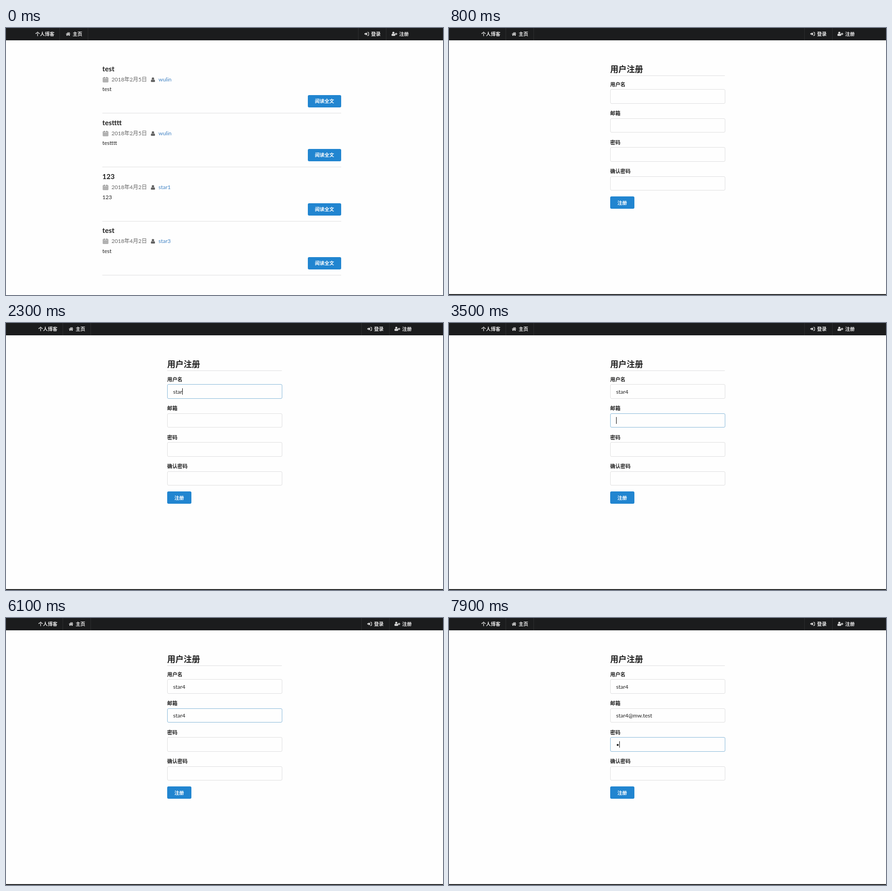
An HTML page for the animation above (8000 ms loop, 957 px wide and 585 px high).

```html
<!DOCTYPE html>
<html lang="zh-CN">
<head>
<meta charset="utf-8">
<title>个人博客</title>
<style>
  html, body { margin: 0; width: 100%; height: 100%; overflow: hidden; background: #fefefe; }
  svg { display: block; width: 957px; height: 585px; }
  text { font: 12px Lato, "Noto Sans CJK SC", "Noto Sans CJK", sans-serif; fill: #212121; white-space: pre; }
  rect { shape-rendering: crispEdges; }
  .bold, .nav, .btn, .label, .head, .title { font-weight: 700; }
  .nav, .btn { font-size: 10.5px; }
  .nav { fill: #e8e8e8; }
  .btn { fill: #fff; }
  .label { font-size: 11.14px; }
  .head { font-size: 15.43px; }
  .title { font-size: 18px; }
  .meta { fill: #666; }
  .link { fill: #4183c4; }
  .bar { fill: #1b1c1d; }
  .sep { fill: #2d2e2f; }
  .rule { fill: #dededf; }
  .blue { fill: #2185d0; shape-rendering: auto; }
  .box { fill: #fefefe; stroke: #dededf; shape-rendering: auto; }
  .box.on { stroke: #85b7d9; }
  .icon { fill: #dcdcdc; }
  .gray { fill: #606060; }
  .line { fill: none; stroke: #dcdcdc; stroke-width: 1.3; }
  .thin { fill: none; stroke: #6c6c6c; stroke-width: .8; }
</style>
</head>
<body>
<svg id="stage" viewBox="0 0 957 585">
  <defs>
    <g id="user">
      <circle cx="4.5" cy="2.8" r="2.6"/>
      <path d="M2.3 5Q4.5 6.9 6.7 5Q9 5 9 8.8Q9 10.3 7.6 10.3H1.4Q0 10.3 0 8.8Q0 5 2.3 5Z"/>
    </g>
    <g id="calendar" class="thin">
      <path d="M.5 2H11.5V11.5H.5ZM.5 4.4H11.5M.5 6.8H11.5M.5 9.1H11.5M3.2 4.4V11.5M6 4.4V11.5M8.8 4.4V11.5"/>
      <path d="M3.3 .4V3M8.7 .4V3" stroke-width="1.5"/>
    </g>
    <g id="home">
      <path d="M0 4.6L5 .3L7.2 2.2V.8H8.6V3.4L10 4.6L9.4 5.3L5 1.6L.6 5.3Z"/>
      <path d="M1.5 5.3L5 2.4L8.5 5.3V8.4H5.9V5.9H4.1V8.4H1.5Z"/>
    </g>
    <g id="login">
      <path d="M0 3H3.2V.9L7 4.4L3.2 7.9V5.8H0Z"/>
      <path class="line" d="M6.2 .8H8Q9.3 .8 9.3 2V6.8Q9.3 8 8 8H6.2"/>
    </g>
    <g id="join">
      <use href="#user" transform="scale(.9)"/>
      <path d="M9.2 2.4H10.8V4.2H12.8V5.8H10.8V7.6H9.2V5.8H7.3V4.2H9.2Z"/>
    </g>
  </defs>
  <g id="blog"></g>
  <g id="signup"></g>
</svg>
<script>
const LOOP = 8000, OPEN_AT = 800, HOVER_AT = 200;
const byId = id => document.getElementById(id);

const text = (x, y, cls, s, id = "") => `<text x="${x}" y="${y}" class="${cls}" id="${id}">${s}</text>`;
const icon = (name, x, y, cls = "icon") => `<use href="#${name}" class="${cls}" transform="translate(${x} ${y})"/>`;
// Rectangle with edges snapped to whole pixels
const rect = (x, y, w, h, cls, extra = "") => {
  const l = Math.round(x), t = Math.round(y);
  return `<rect x="${l}" y="${t}" width="${Math.round(x + w) - l}" height="${Math.round(y + h) - t}" class="${cls}" ${extra}/>`;
};

function navBar(dx, hover = "") {
  const seps = [117.3, 178.6, 771.3, 832.3].map(x => rect(x + dx, 0, 1, 27, "sep")).join("");
  return rect(0, 0, 957, 27.4, "bar") + hover + seps +
    text(64 + dx, 17, "nav", "个人博客") +
    icon("home", 131 + dx, 8.6) + text(146 + dx, 17, "nav", "主页") +
    icon("login", 785 + dx, 8.5) + text(799.5 + dx, 17, "nav", "登录") +
    icon("join", 844.3 + dx, 8) + text(861 + dx, 17, "nav", "注册");
}

function post([title, date, author], i) {
  const at = y => Math.round(y + i * 118.3);
  return text(211, at(94.55), "head", title) +
    icon("calendar", 212, at(106.55), "") + text(231, at(116.55), "meta", date) +
    icon("user", 317.3, at(107.55), "gray") + text(334, at(116.55), "link", author) +
    text(211, at(138.1), "", title) +
    rect(661, at(147.1), 73, 27, "blue", 'rx="3"') + text(676.5, at(164.1), "btn", "阅读全文") +
    rect(211, at(186.1), 523, 1, "rule");
}

function field(label, i) {
  const dy = i * 63.5, top = Math.round(134.25 + dy), end = Math.round(165.6 + dy);
  return text(353, Math.round(127.9 + dy), "label", label) +
    `<rect x="353.5" y="${top + .5}" width="251" height="${end - top - 1}" rx="2.5" class="box" id="box${i}"/>` +
    text(366, Math.round(154.8 + dy), "", "", "val" + i);
}

const posts = [
  ["test", "2018年2月5日", "wulin"],
  ["testttt", "2018年2月5日", "wulin"],
  ["123", "2018年4月2日", "star1"],
  ["test", "2018年4月2日", "star3"]
];
const labels = ["用户名", "邮箱", "密码", "确认密码"];

byId("blog").innerHTML = navBar(0, rect(832, 0, 61, 27, "sep", 'id="hover"')) + posts.map(post).join("");
byId("signup").innerHTML = navBar(6.4) +
  text(353, 97, "title", "用户注册") + rect(353, 104, 251.4, 1, "rule") +
  labels.map(field).join("") +
  rect(353, 369, 53, 27, "blue", 'rx="3"') + text(368.8, 386.5, "btn", "注册") +
  rect(0, 583, 957, 2, "bar") + '<rect id="caret" width="1"/>';

// time, focused field, its value, caret shown
const steps = [
  [1600, 0, "", 1], [2100, 0, "s", 1], [2200, 0, "sta", 1], [2300, 0, "star", 1],
  [2800, 0, "star", 0], [3100, 0, "star4", 1],
  [3500, 1, "", 1], [4000, 1, "st", 1], [4100, 1, "star", 1], [4600, 1, "star", 0],
  [4700, 1, "star4", 1], [5200, 1, "star4", 0], [5600, 1, "star4", 1], [6100, 1, "star4", 0],
  [6200, 1, "star4@", 1], [6600, 1, "star4@m", 1], [6700, 1, "star4@mw", 1],
  [7100, 1, "star4@mw.", 1], [7300, 1, "star4@mw.t", 1], [7400, 1, "star4@mw.tes", 1],
  [7500, 1, "star4@mw.test", 1], [7600, 2, "", 1], [7900, 2, "•", 1]
];

function show(id, on) { byId(id).style.display = on ? "" : "none"; }

function draw(t) {
  const open = t >= OPEN_AT, values = ["", "", "", ""];
  let focus = -1, caretOn = 0;
  for (const [at, i, value, on] of steps) {
    if (at > t) break;
    focus = i; values[i] = value; caretOn = on;
  }
  show("blog", !open);
  show("signup", open);
  show("hover", t >= HOVER_AT);
  show("caret", caretOn);
  values.forEach((value, i) => {
    const el = byId("val" + i);
    if (el.textContent !== value) el.textContent = value;
    byId("box" + i).classList.toggle("on", i === focus);
  });
  if (caretOn) {
    const y = 142.75 + focus * 63.5, top = Math.round(y);
    const w = values[focus] ? byId("val" + focus).getComputedTextLength() : 0;
    const caret = byId("caret");
    caret.setAttribute("x", Math.round(366 + w));
    caret.setAttribute("y", top);
    caret.setAttribute("height", Math.round(y + 14.45) - top);
  }
}

let start;
function tick(now) {
  start ??= now;
  draw((now - start) % LOOP);
  requestAnimationFrame(tick);
}
draw(0);
requestAnimationFrame(tick);
</script>
</body>
</html>
```
